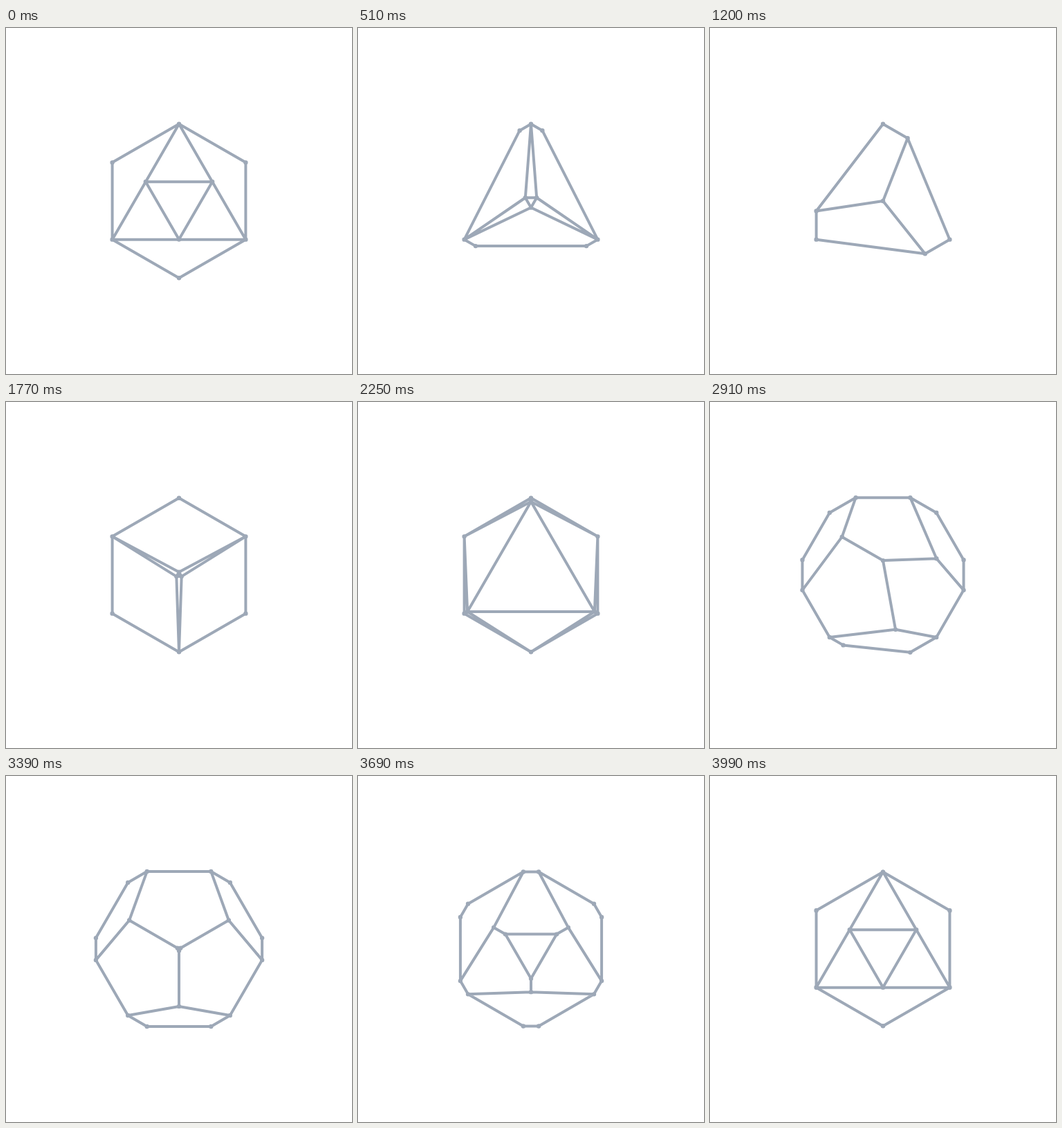
An HTML page for the animation above (4.02 s loop, 500 px wide and 500 px high).

```html
<!DOCTYPE html>
<html lang="en">
<head>
<meta charset="utf-8">
<title>Morphing solids</title>
<style>
  html, body { margin: 0; width: 100%; height: 100%; overflow: hidden; background: #fff; }
  svg { display: block; width: 100vw; height: 100vh; }
  path { fill: none; stroke: #9da8b7; stroke-linecap: round; stroke-linejoin: round; }
</style>
</head>
<body>
<svg viewBox="0 0 500 500">
  <path id="lines" stroke-width="4"/>
  <path id="dots" stroke-width="6.4"/>
</svg>
<script>
const LOOP = 4020, STEP = 30, DELAY = 8;

// Angles run clockwise from the top.
function polar(radius, degrees) {
  const a = degrees * Math.PI / 180;
  return [250 + radius * Math.sin(a), 250 - radius * Math.cos(a)];
}

// h: hexagon corners, a/b: dodecahedron rim, p/q: inner triangles, c: centre
const points = { c: [250, 250] };
for (let k = 0; k < 6; k++) {
  points["h" + k] = polar(111.3, 60 * k);
  points["a" + k] = polar(122, 60 * k - 23.4);
  points["b" + k] = polar(122, 60 * k + 23.4);
}
[300, 60, 180].forEach((angle, i) => {
  points["p" + (i + 1)] = polar(55.6, angle);
  points["q" + (i + 1)] = polar(84.2, angle);
});

const rim = "a0 b0 a1 b1 a2 b2 a3 b3 a4 b4 a5 b5 a0";
const pentagons = [rim, "q1 c q2", "c q3", "a0 q1 b4", "b0 q2 a2", "b2 q3 a4"];

// Each move reads vertex:from>to; each chain is a line through vertices.
function stage(moves, chains) {
  const vertices = {};
  for (const move of moves.split(" ")) {
    const [name, from, to] = move.split(/[:>]/);
    vertices[name] = [points[from], points[to || from]];
  }
  return { vertices, chains: chains.map(chain => chain.split(" ")) };
}

const stages = [
  stage("top:h0 right:h2 left:h4 e:h5>h0 f:h1>h0 g:h3>h4 k:h3>h2 x:p1>c y:p2>c z:p3>c",
    ["top f right k g left e top", "x y z x", "x top y right z left x"]),
  stage("c:c top:h0 right:h2 left:h4 x:h4>h5 y:h0>h1 z:h2>h3",
    ["top y right z left x top", "x c y", "c z"]),
  stage("h0:h0 h1:h1 h2:h2 h3:h3 h4:h4 h5:h5 x:c>h0 y:c>h2 z:c>h4",
    ["h0 h1 h2 h3 h4 h5 h0", "x y z x", "h5 x h1 y h3 z h5"]),
  stage("a0:h0>a0 b0:h0>b0 a1:h1>a1 b1:h1>b1 a2:h2>a2 b2:h2>b2 a3:h3>a3 b3:h4>b3 " +
    "a4:h4>a4 b4:h4>b4 a5:h5>a5 b5:h5>b5 c:h0>c q1:h0>q1 q2:h2>q2 q3:h2>q3", pentagons),
  stage("a0:a0>h0 b0:b0>h0 a1:a1>h1 b1:b1>h1 a2:a2>h2 b2:b2>h2 a3:a3>h3 b3:b3>h3 " +
    "a4:a4>h4 b4:b4>h4 a5:a5>h5 b5:b5>h5 x:c>p1 y:c>p2 z:c>p3 q1:q1>p1 q2:q2>p2 q3:q3>p3",
    [rim, "x y z x", "q1 x", "q2 y", "q3 z", "a0 q1 b4", "b0 q2 a2", "b2 q3 a4"])
];

// Circular ease in and out.
function ease(u) {
  return u < 0.5
    ? (1 - Math.sqrt(1 - 4 * u * u)) / 2
    : (1 + Math.sqrt(1 - 4 * (1 - u) * (1 - u))) / 2;
}

const lines = document.getElementById("lines");
const dots = document.getElementById("dots");

function draw(time) {
  const t = Math.floor(time % LOOP / STEP) * STEP;
  const phase = (t - DELAY + LOOP) % LOOP / LOOP * stages.length;
  const index = Math.floor(phase);
  const { vertices, chains } = stages[index];
  const s = ease(phase - index);
  const at = {};
  for (const name in vertices) {
    const [from, to] = vertices[name];
    at[name] = from.map((v, i) => (v + (to[i] - v) * s).toFixed(2)).join(" ");
  }
  lines.setAttribute("d", chains.map(chain => "M" + chain.map(n => at[n]).join("L")).join(""));
  dots.setAttribute("d", Object.values(at).map(p => `M${p}h0.01`).join(""));
}

function tick() {
  draw(performance.now());
  requestAnimationFrame(tick);
}
tick();
</script>
</body>
</html>
```
